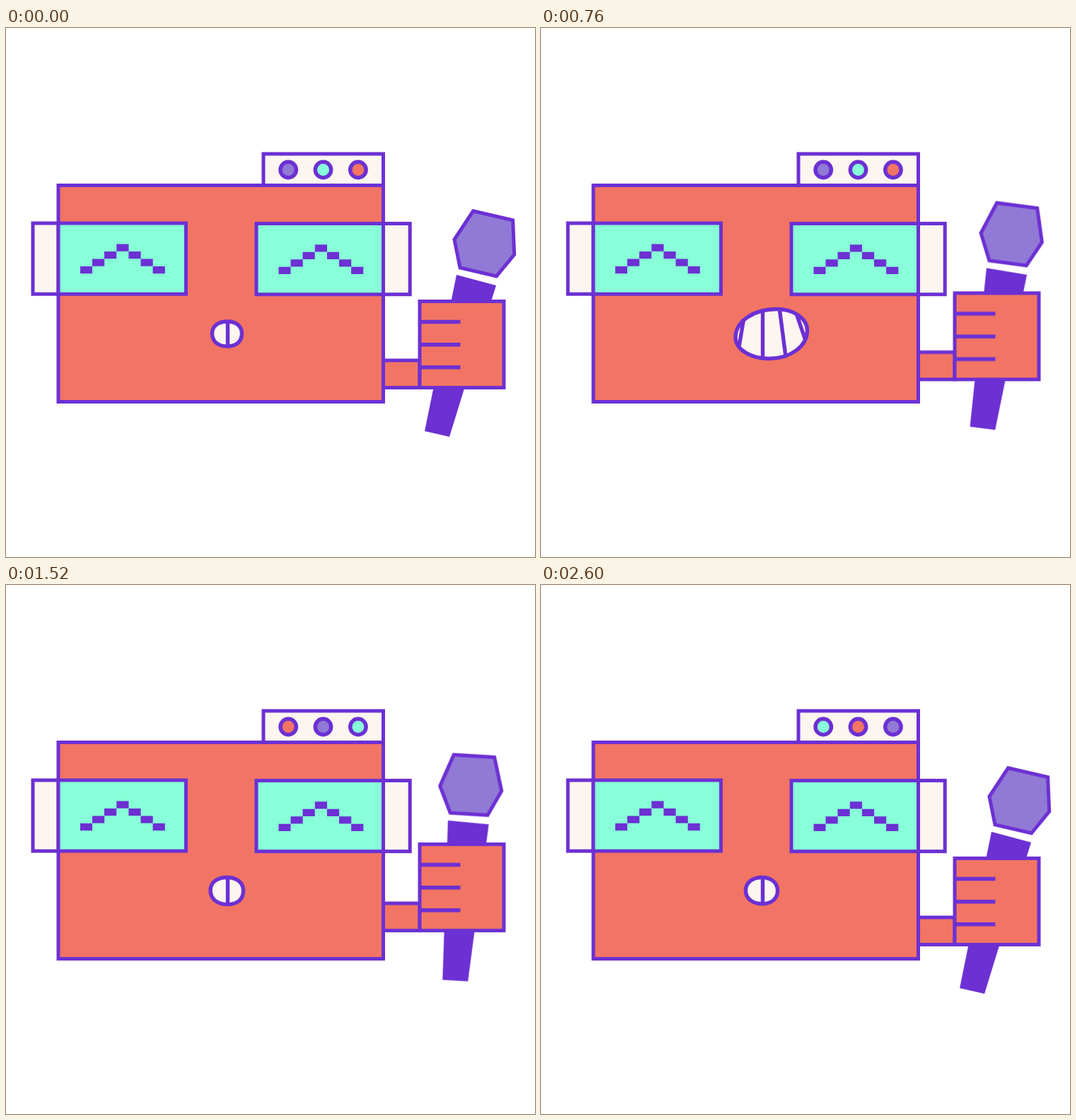
These frames come from a looping animation (748 px wide and 748 px high, 2640 ms). An HTML page:

```html
<!DOCTYPE html>
<html lang="en">
<head>
<meta charset="utf-8">
<title>Singing robot</title>
<style>
  :root {
    --line: #6c30d3;
    --coral: #f27464;
    --mint: #88ffd8;
    --lilac: #9179d6;
    --cream: #fcf5f0;
    --loop: 2640ms;
    --sine: cubic-bezier(.364, 0, .636, 1);
  }
  html, body { margin: 0; height: 100%; overflow: hidden; background: #fff; }
  svg { display: block; width: 100vw; height: 100vh; }

  .box { stroke: var(--line); stroke-width: 5; }
  .coral { fill: var(--coral); }
  .mint { fill: var(--mint); }
  .cream { fill: var(--cream); }
  .lilac { fill: var(--lilac); }
  .solid { fill: var(--line); }
  .rule { fill: none; stroke: var(--line); stroke-width: 5.4; }

  .arm { animation: lift var(--loop) var(--sine) infinite; }
  .mic { transform-origin: 654px 423px; animation: tilt var(--loop) var(--sine) infinite; }
  .lips { animation: sing var(--loop) var(--sine) infinite; }
  .lamp { stroke: var(--line); stroke-width: 5.5; animation: blink var(--loop) step-end infinite; }
  .lamp:nth-of-type(2) { animation-delay: -1760ms; }
  .lamp:nth-of-type(3) { animation-delay: -880ms; }

  @keyframes lift { 53% { transform: translateY(-20.4px); } }
  @keyframes tilt { 53% { transform: rotate(-9.8deg); } }
  @keyframes blink {
    0% { fill: var(--lilac); }
    33.333% { fill: var(--coral); }
    66.666%, 100% { fill: var(--mint); }
  }
  @keyframes sing {
    0%, 53% { d: path("M313 415C325.7 415 333.5 421.5 333.5 432C333.5 443.2 325.7 450 313 450C299.7 450 291.5 443.2 291.5 432C291.5 421.5 299.7 415 313 415Z"); }
    26.5% { d: path("M333.5 397.2C358 397.2 377.3 410.5 377.3 427.5C377.3 450.1 353.4 467.8 323 467.8C296 467.8 274.7 454.5 274.7 437.5C274.7 414.9 300.6 397.2 333.5 397.2Z"); }
    77.3% { d: path("M306.5 397C335.1 397 357.5 414.8 357.5 437.5C357.5 455.3 339.9 469.2 317.5 469.2C287.7 469.2 264.2 451.5 264.2 429C264.2 411.1 282.8 397 306.5 397Z"); }
    100% { d: path("M312.5 413.7C325.6 413.7 334.3 421.1 334.3 432.3C334.3 443.3 325.8 450.6 313 450.6C299 450.6 289.7 443.2 289.7 432C289.7 421 298.8 413.7 312.5 413.7Z"); }
  }
</style>
</head>
<body>
<svg viewBox="0 0 748 748">
  <defs>
    <clipPath id="mouth"><path class="lips"/></clipPath>
    <path id="smile" class="solid" d="M0 31.5h17v10.4H0zM17 21h17.2v10.4H17zM34 10.5h17.2v10.4H34zM51.3 0h17.2v10.4H51.3zM68.4 10.5h17.2v10.4H68.4zM85.5 21h17.2v10.4H85.5zM102.6 31.5h17.2v10.4H102.6z"/>
  </defs>

  <g class="arm">
    <rect class="box coral" x="533.5" y="470" width="51.5" height="38.5"/>
    <g class="mic">
      <path class="solid" d="M637 349L693 364L627 578L592 570Z"/>
      <path class="box lilac" d="M660.5 258.8L716.7 271.8L718.7 320.3L693.5 351L642 339L634 299Z"/>
    </g>
    <rect class="box coral" x="585" y="386.5" width="119" height="122"/>
    <path class="rule" d="M585 415.5h57.5M585 447.7h57.5M585 479.8h57.5"/>
  </g>

  <g>
    <rect class="box cream" x="364" y="178" width="169.5" height="44.5"/>
    <circle class="lamp" cx="399.2" cy="200.5" r="11.2"/>
    <circle class="lamp" cx="448.5" cy="200.5" r="11.2"/>
    <circle class="lamp" cx="497.9" cy="200.5" r="11.2"/>
  </g>

  <rect class="box coral" x="74" y="222.5" width="459.5" height="306"/>

  <rect class="box cream" x="38" y="276" width="36" height="100.2"/>
  <rect class="box mint" x="74" y="276" width="180.5" height="100.2"/>
  <use href="#smile" x="105" y="305.4"/>
  <rect class="box mint" x="354" y="276.5" width="179.5" height="100.2"/>
  <rect class="box cream" x="533.5" y="276.5" width="37.7" height="100.2"/>
  <use href="#smile" x="385.5" y="306.2"/>

  <g clip-path="url(#mouth)">
    <rect class="cream" x="250" y="380" width="140" height="100"/>
    <path class="rule" d="M313.5 380V480M335 380L348 480M292 380L275 480M353 380L387 480M274 380L240 480"/>
  </g>
  <path class="lips rule"/>
</svg>
</body>
</html>
```
